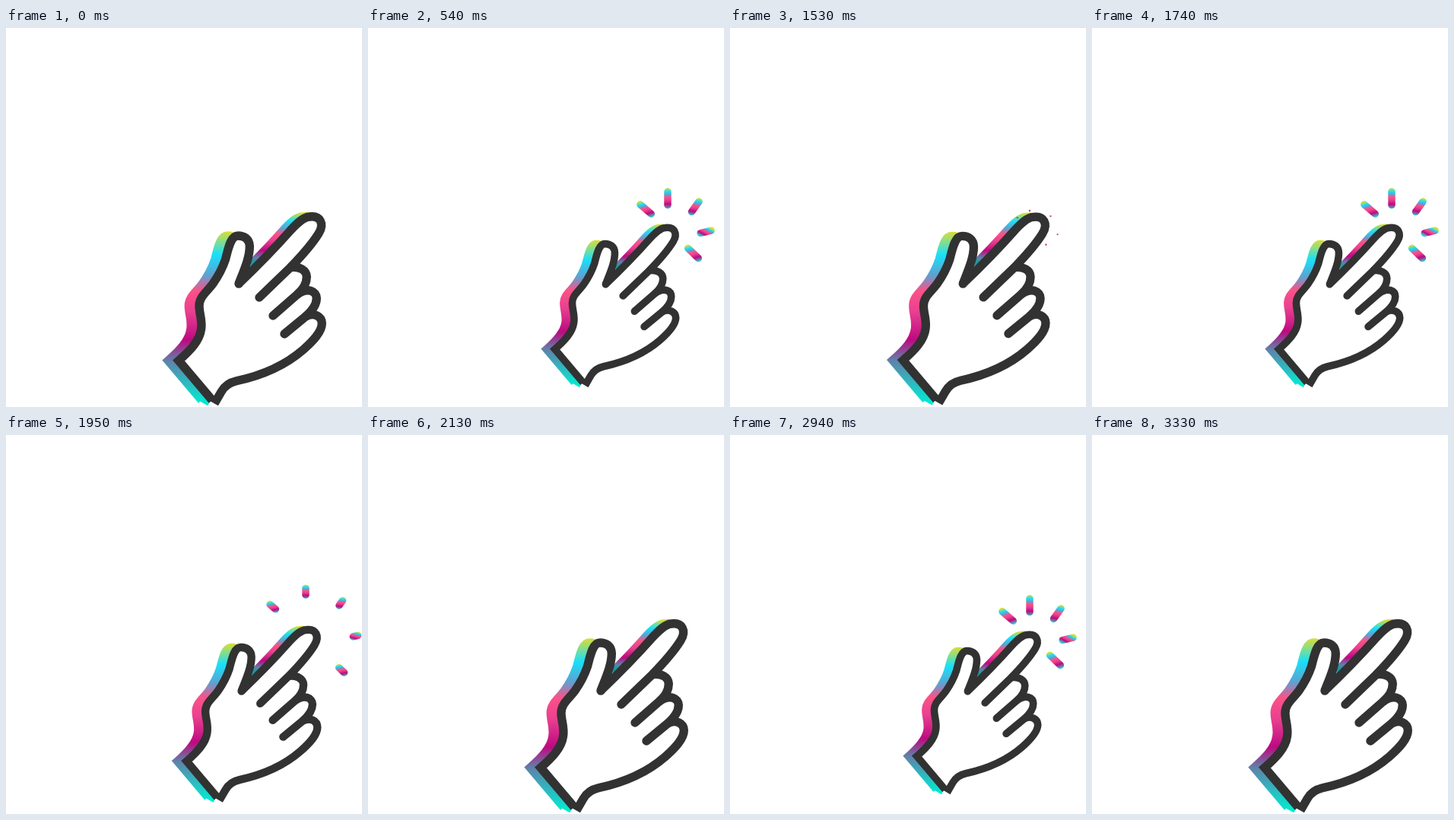
Animation of 468x498 px, one loop 3.6 s. Source, as an HTML page with a canvas:

```html
<!DOCTYPE html>
<html lang="en">
<head>
<meta charset="utf-8">
<title>Click</title>
<style>
  html, body { margin: 0; width: 100%; height: 100%; overflow: hidden; background: #fff; }
  canvas { display: block; }
</style>
</head>
<body>
<canvas id="stage" width="468" height="498"></canvas>
<script>
const ctx = document.getElementById('stage').getContext('2d');
const PERIOD = 1200;
const INK = '#323232';
const PIVOT = [347, 341];
const LINE = 11.4;

const outline = new Path2D(`M274 493.5 L283 478 C287 471 293 466 303 463.8
  C330 458 364 446 391 422.5 C404 411 415.3 399 415.3 388
  C415 379 405 373 394 379 C402 372 408.3 364 408.3 355
  C408 346 397 340 383 350 C391 343 395.3 335 395.3 327
  C395 318 386 313 374 314.5 C390 298 403 283 411 270
  C419 257 413 246 399 248 C391 248.5 383 256 373 267
  C350 293 330 313 306 336
  C313 318 320.3 302 320.3 287 C320 277 313 273 305 273
  C295 273 292 291 288.5 304 C284.5 316 279 326 272 336
  C264 347 254 353 254 365 C254 376 258.5 384 256.5 396
  C254.5 411 242 424 227 437 L271 489`);
const creases = new Path2D(`M374 314.5 L333 354 M383 350 L351 378
  M394 379 L366 402 M306 336 L306 336.1`);

const RAMP = [
  [0, '#dcdc34'], [0.18, '#18e0fa'], [0.34, '#60a0d0'], [0.46, '#fb5288'],
  [0.62, '#ea4090'], [0.84, '#bc0a80'], [1, '#5f82aa']
];

// Inner and outer tip of each ray
const RAYS = [
  [375.5, 247, 354, 228.5],
  [394, 237, 394, 210],
  [423, 245, 438, 224],
  [433, 270.5, 456, 265],
  [417.5, 286.5, 438, 306]
];

function ramp(x0, y0, x1, y1, span, last) {
  const g = ctx.createLinearGradient(x0, y0, x1, y1);
  for (const [p, c] of RAMP) g.addColorStop(p * span, c);
  g.addColorStop(1, last);
  return g;
}

const bodyFill = ramp(0, 267, 0, 494, 0.75, '#00ecd4');
const indexFill = ramp(0, 243, 0, 307, 0.92, '#1a9aa0');

function strokeOutline(paint) {
  ctx.strokeStyle = paint;
  ctx.lineWidth = LINE;
  ctx.lineCap = 'butt';
  ctx.lineJoin = 'miter';
  ctx.miterLimit = 1.6;
  ctx.stroke(outline);
}

// Coloured copy of the hand, shifted left, between two x positions
function shadow(paint, shift, left, right) {
  ctx.save();
  ctx.beginPath();
  ctx.rect(left, 0, right - left, 520);
  ctx.clip();
  ctx.translate(-shift, 0);
  ctx.fillStyle = paint;
  ctx.fill(outline);
  strokeOutline(paint);
  ctx.restore();
}

function drawHand(scale) {
  const [px, py] = PIVOT;
  ctx.save();
  ctx.translate(px, py);
  ctx.scale(scale, scale);
  ctx.translate(-px, -py);

  shadow(bodyFill, 13.7, 0, 322);
  shadow(indexFill, 9.5, 322, 468);

  ctx.fillStyle = '#fff';
  ctx.fill(outline);
  strokeOutline(INK);
  ctx.lineCap = 'round';
  ctx.stroke(creases);
  ctx.restore();
}

function drawRay([ix, iy, ox, oy], from, to) {
  const dx = ox - ix, dy = oy - iy, full = Math.hypot(dx, dy);
  const len = full * (to - from);
  if (len < 0.5) return;
  const w = Math.min(9.5, len * 0.9);
  const pad = w / 2 / full;
  const at = q => [ix + dx * q, iy + dy * q];
  const a = at(from + pad), b = at(to - pad);
  const [hi, lo] = a[1] < b[1] ? [a, b] : [b, a];
  const mx = (hi[0] + lo[0]) / 2, half = (hi[0] - lo[0]) / 4;
  ctx.strokeStyle = ramp(mx + half, hi[1] - w / 2, mx - half, lo[1] + w / 2, 0.93, '#3fc0d8');
  ctx.lineWidth = w;
  ctx.lineCap = 'round';
  ctx.beginPath();
  ctx.moveTo(...a);
  ctx.lineTo(...b);
  ctx.stroke();
}

function drawRays(t) {
  const u = (t - 315) / 525;
  if (u <= 0 || u >= 1) return;
  // The tip runs ahead and the tail catches up
  const q = k => (44 * k - 4) / 26;
  const tail = q(u ** 3), tip = q(1 - (1 - u) ** 2);
  for (const ray of RAYS) drawRay(ray, tail, tip);
}

const smooth = p => Math.sin(Math.PI / 2 * Math.min(1, Math.max(0, p))) ** 2;

function handScale(t) {
  const press = t < 585 ? (t - 300) / 285 : (930 - t) / 345;
  return 1 - 0.165 * smooth(press);
}

function draw(now) {
  const t = Math.max(0, now - start) % PERIOD;
  ctx.fillStyle = '#fff';
  ctx.fillRect(0, 0, 468, 498);
  drawHand(handScale(t));
  drawRays(t);
  requestAnimationFrame(draw);
}

const start = performance.now();
draw(start);
</script>
</body>
</html>
```
